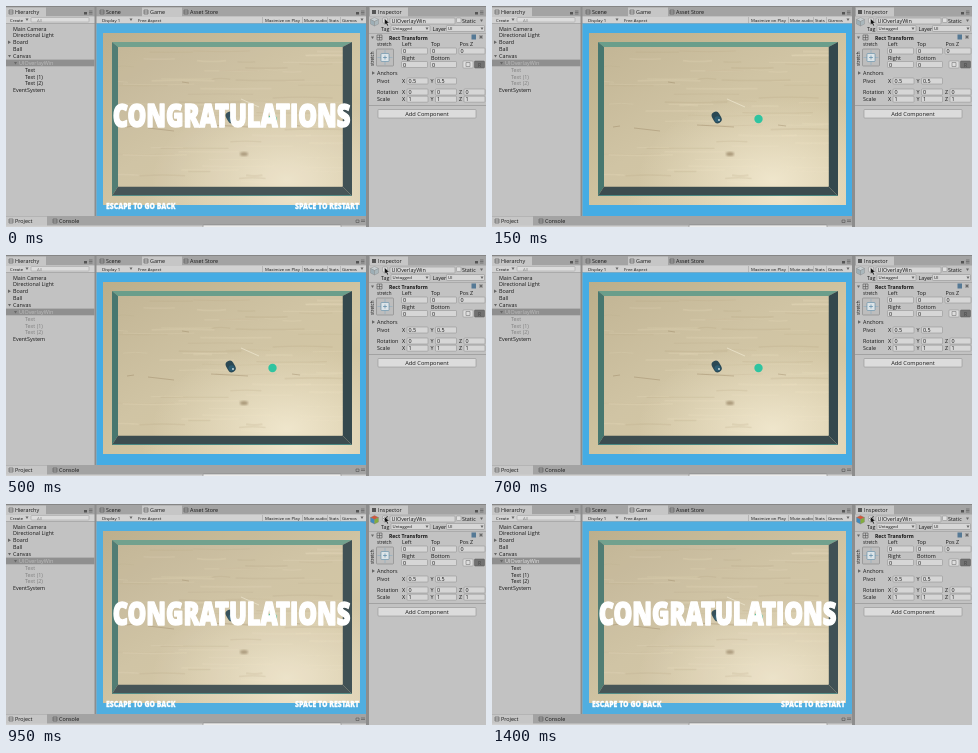
Recreate the animation shown at these times as an HTML page. Size 480 by 221 pixels, loop 1.45 s.

```html
<!DOCTYPE html>
<html lang="en">
<head>
<meta charset="utf-8">
<title>Overlay toggle</title>
<style>
html, body { margin: 0; width: 100%; height: 100%; overflow: hidden; background: #c2c2c2; }
svg { display: block; width: 100vw; height: 100vh; }
text { font: 500 5.4px "Open Sans", sans-serif; fill: #161616; }
.bold { font-size: 5.1px; font-weight: 700; }
.small { font-size: 4.3px; }
#selected { fill: #e6e6e6; }
.dim #selected { fill: #bdbdbd; }
.off .child { fill: #808080; }
.shout text { font-weight: 800; fill: #fff; stroke: #fff; stroke-linejoin: round; transform: scaleX(.75); }
.shout .title { font-size: 31.5px; stroke-width: 1.6px; }
.shout .hint { font-size: 9.2px; stroke-width: .3px; }
</style>
</head>
<body>
<svg id="stage" viewBox="0 0 480 221" preserveAspectRatio="none">
  <defs>
    <linearGradient id="wood" x2="1" y2="1">
      <stop offset="0" stop-color="#c3b696"/>
      <stop offset=".45" stop-color="#d0c4a4"/>
      <stop offset="1" stop-color="#d5c8a4"/>
    </linearGradient>
    <radialGradient id="glow" cx=".75" cy=".95" r=".6">
      <stop stop-color="#f2e9d0" stop-opacity=".9"/>
      <stop offset="1" stop-color="#f2e9d0" stop-opacity="0"/>
    </radialGradient>
    <linearGradient id="rim" x2="1" y2="1">
      <stop offset="0" stop-color="#bbae8a"/>
      <stop offset=".6" stop-color="#d3c7a4"/>
      <stop offset="1" stop-color="#cfc09a"/>
    </linearGradient>
    <filter id="soft"><feGaussianBlur stdDeviation="1.2"/></filter>
    <clipPath id="floor"><path d="M112 41H336.500V180.500H112z"/></clipPath>
  </defs>

  <g id="chrome"></g>

  <path fill="#45ace4" d="M90.500 17.500H360V210H90.500z"/>
  <path fill="url(#rim)" d="M97 27H354V199H97z"/>
  <path fill="url(#glow)" d="M97 27H354V199H97z"/>
  <path fill="#6a9e8b" d="M106 36H346L336.500 41H112z"/>
  <path fill="#47776f" d="M106 36L112 41V180.500L106 190z"/>
  <path fill="#34484d" d="M346 36L336.500 41V180.500L346 190z"/>
  <path fill="#3c4c4f" d="M106 190L112 180.500H336.500L346 190z"/>
  <path fill="none" stroke="#4b8983" d="M106.500 189.500H345.500"/>
  <g clip-path="url(#floor)">
    <path fill="url(#wood)" d="M112 41H337V181H112z"/>
    <path fill="url(#glow)" d="M112 41H337V181H112z"/>
    <g id="grain" fill="none"></g>
  </g>
  <ellipse cx="238" cy="148" rx="4" ry="2" fill="#7b6544" opacity=".55" filter="url(#soft)"/>
  <path fill="none" stroke="#8e7a58" stroke-width=".6" opacity=".6" d="M121 121l7-1M142 122l26 3M205 119l37 2M286 119l8 1M176 76l7 1"/>
  <path fill="none" stroke="#eee7d2" stroke-width=".9" opacity=".8" d="M235 93l18 8"/>
  <path stroke="#2a4854" stroke-width="8" stroke-linecap="round" d="M223.700 109.700L225.700 113.300"/>
  <circle cx="225.500" cy="113.300" r="3" fill="#2c5c72"/>
  <circle cx="227" cy="114" r=".9" fill="#d5e5e5"/>
  <circle cx="266.500" cy="113" r="4.200" fill="#2fc4a0"/>

  <g id="overlay" class="shout">
    <path fill="#c8c2b4" opacity=".08" d="M90.500 17.500H360V210H90.500z"/>
    <g transform="translate(225.500 121)"><text class="title" text-anchor="middle">CONGRATULATIONS</text></g>
    <g transform="translate(100 202.700)"><text class="hint">ESCAPE TO GO BACK</text></g>
    <g transform="translate(353 202.700)"><text class="hint" text-anchor="end">SPACE TO RESTART</text></g>
  </g>

  <g id="cube" stroke="#777" stroke-width=".3">
    <path d="M364.500 13.500l4-2 4 2-4 2z"/>
    <path d="M364.500 13.500l4 2v4.500l-4-2z"/>
    <path d="M372.500 13.500l-4 2v4.500l4-2z"/>
  </g>
  <path id="check" fill="none" stroke="#222" stroke-width=".8" d="M377.500 14.500l1.500 1.500 2.500-4"/>
  <path fill="#111" stroke="#eee" stroke-width=".4" d="M378.500 12.500v6.500l1.600-1.400 1.100 2.400 1.200-.6-1.100-2.300h2z"/>
</svg>
<script>
const $ = id => document.getElementById(id);
let ui = "";
const rect = (x, y, w, h, fill, line) => {
  ui += `<rect x="${x}" y="${y}" width="${w}" height="${h}" fill="${fill}"${line ? ` stroke="${line}" stroke-width=".5" rx=".8"` : ""}/>`;
};
const path = (d, fill = "#666", stroke = "none") => {
  ui += `<path d="${d}" fill="${fill}" stroke="${stroke}" stroke-width=".6"/>`;
};
const text = (x, y, s, attrs = "") => { ui += `<text x="${x}" y="${y + 2}" ${attrs}>${s}</text>`; };
const small = (x, y, s) => text(x, y - .4, s, 'class="small"');
const field = (x, y, w, s, write = text) => {
  rect(x, y - 3, w, 6, "#d6d6d6", "#8b8b8b");
  write(x + 1.5, y, s);
};
const arrow = (x, y) => path(`M${x - 1.5} ${y - 1}h3l-1.500 2.500z`);
const fold = (x, y) => path(`M${x - 1} ${y - 1.7}l3 1.700-3 1.700z`);
const icon = (x, y) => path(`M${x} ${y - 2}h4v4h-4zM${x} ${y}h4`, "none", "#555");
const menu = x => {
  path(`M${x} 5h3.500M${x} 6.500h3.500M${x} 8h3.500`, "none", "#555");
  path(`M${x - 5} 6h3v2.500h-3z`, "#555");
};

// Panel frames, tabs and toolbars
rect(0, 0, 480, 221, "#c2c2c2");
rect(0, 1, 480, 9.5, "#a3a3a3");
rect(0, 1.5, 40, 9, "#c6c6c6");
rect(136, 1.5, 40, 9, "#c6c6c6");
rect(364, 1.5, 38, 9, "#c6c6c6");
rect(0, 10.5, 360, 7, "#d2d2d2");
rect(0, 17.3, 360, .5, "#8d8d8d");
rect(0, 210, 361, 11, "#a3a3a3");
rect(0, 210.5, 41, 10.5, "#c6c6c6");
rect(0, 219.5, 361, 1.5, "#d0d0d0");
rect(197, 219, 138, 4, "#ececec", "#777");
rect(88.5, 0, 2, 210, "#8d8d8d");
rect(360, 0, 3, 221, "#8d8d8d");
rect(0, 0, 480, 1, "#858585");
icon(3, 6); text(9, 6, "Hierarchy");
icon(94, 6); text(100, 6, "Scene");
icon(138, 6); text(144, 6, "Game");
icon(178, 6); text(184, 6, "Asset Store");
path("M366 4h4v4h-4z", "#555"); text(372, 6, "Inspector");
icon(3, 215); text(9, 215, "Project");
icon(47, 215); text(53, 215, "Console");
[83, 355, 474].forEach(menu);
path("M350 214h3v2.500h-3zM355 214h4M355 215.500h4", "none", "#555");
small(4, 14, "Create"); arrow(21, 13.5);
rect(25, 11.5, 58, 4.5, "#dcdcdc", "#999");
text(31, 13.6, "All", 'class="small" style="fill:#888"');
small(96, 14, "Display 1"); arrow(125, 13.5);
small(132, 14, "Free Aspect");
small(259, 14, "Maximize on Play");
small(298, 14, "Mute audio");
small(323, 14, "Stats");
small(336, 14, "Gizmos"); arrow(356, 13.5);
[256, 296, 321, 334].forEach(x => rect(x, 11, .5, 6, "#9a9a9a"));

// Hierarchy rows
rect(0, 53.6, 88.5, 6.7, "#8f8f8f");
text(7, 22.5, "Main Camera");
text(7, 29.3, "Directional Light");
text(7, 36.2, "Board"); fold(3, 36.2);
text(7, 43, "Ball");
text(7, 50, "Canvas"); arrow(3.5, 50);
text(13, 57, "UIOverlayWin", 'id="selected"'); arrow(9.5, 57);
["Text", "Text (1)", "Text (2)"].forEach((s, i) => text(19, 63.7 + i * 6.8, s, 'class="child"'));
text(7, 84, "EventSystem");

// Inspector
rect(376.5, 12, 5, 5, "#dedede", "#888");
field(384, 15, 65, "UIOverlayWin");
rect(450.5, 12, 4.5, 4.5, "#e0e0e0", "#888");
text(456, 14.5, "Static"); arrow(475.5, 14.5);
text(375, 22.5, "Tag"); field(385, 22.5, 39, "Untagged", small); arrow(421, 22.5);
text(426.5, 22.5, "Layer"); field(440.5, 22.5, 38, "UI", small); arrow(476, 22.5);
rect(363, 27, 117, .5, "#929292");
arrow(366.5, 31.5);
path("M371 29h5v5h-5zM373.500 29v5M371 31.500h5", "none", "#555");
text(383, 31.5, "Rect Transform", 'class="bold"');
rect(465.5, 28.5, 4.5, 5, "#557995");
path("M473 31h4M475 29v4M473.500 29.500l3 3M476.500 29.500l-3 3", "none", "#555");
text(371, 38, "stretch", 'style="font-size:4.500px"');
rect(370.5, 43, 17, 17, "#bdbdbd", "#777");
path("M371.500 51.500h15M379 44v15", "none", "#8badc2");
rect(375, 47.5, 8, 8, "#dce4e8", "#477d9d");
path("M377 51.500h4M379 49.500v4", "none", "#4a7e9f");
ui += '<text transform="translate(368 60) rotate(-90)" style="font-size:4.500px">stretch</text>';
const columns = [395.5, 424.5, 453];
["Left", "Top", "Pos Z"].forEach((s, i) => {
  text(columns[i] + .5, 38, s);
  field(columns[i], 45, 26, "0");
});
["Right", "Bottom"].forEach((s, i) => {
  text(columns[i] + .5, 51.8, s);
  field(columns[i], 58.5, 26, "0");
});
rect(457, 55, 10, 7, "#dedede", "#888");
rect(468.5, 55, 10, 7, "#727272", "#555");
path("M460 56.500h4v4h-4z", "none", "#777");
text(472, 58.5, "R", 'style="fill:#444;font-size:5px"');
text(371, 67, "Anchors"); fold(367, 67);
const vector = (y, name, values) => {
  text(371, y, name);
  values.forEach((v, i) => {
    text(396 + i * 28.5, y, "XYZ"[i]);
    field(401 + i * 28.5, y, 21, v);
  });
};
vector(75, "Pivot", ["0.5", "0.5"]);
vector(86, "Rotation", [0, 0, 0]);
vector(93.2, "Scale", [1, 1, 1]);
rect(363, 99, 117, .6, "#8e8e8e");
rect(372, 103.5, 98, 8.5, "#dcdcdc", "#858585");
text(421, 107.7, "Add Component", 'text-anchor="middle" style="font-size:5.700px"');
$("chrome").innerHTML = ui;

// Seeded wood streaks
let seed = 7, grain = "";
const random = () => (seed = seed * 16807 % 2147483647) / 2147483647;
for (let i = 0; i < 70; i++) {
  const x = 100 + random() * 220, y = 42 + random() * 138, w = 15 + random() * 60;
  grain += `<path d="M${x} ${y}q${w / 2} ${random() * 4 - 2} ${w} 0" stroke="${random() < .5 ? "#a89570" : "#eee4c7"}" stroke-width="${.5 + random() * 1.5}" opacity=".16"/>`;
}
$("grain").innerHTML = grain;

// The inspector reacts first, then the game view, then the hierarchy
const HIDE = 150, SHOW = 950, REFRESH = 1000, LOOP = 1450;
const live = ["#d3573b", "#4189bd", "#83ad3e"], idle = ["#c7ced1", "#9daeb6", "#aab7bc"];
const start = performance.now();
function draw(now) {
  const t = Math.max(0, now - start) % LOOP;
  const active = t >= SHOW;
  $("overlay").style.display = t < HIDE || active ? "" : "none";
  $("stage").classList.toggle("dim", t < REFRESH);
  $("stage").classList.toggle("off", t >= HIDE && t < REFRESH);
  $("check").style.display = active ? "" : "none";
  [...$("cube").children].forEach((face, i) => face.setAttribute("fill", (active ? live : idle)[i]));
  requestAnimationFrame(draw);
}
draw(start);
</script>
</body>
</html>
```
